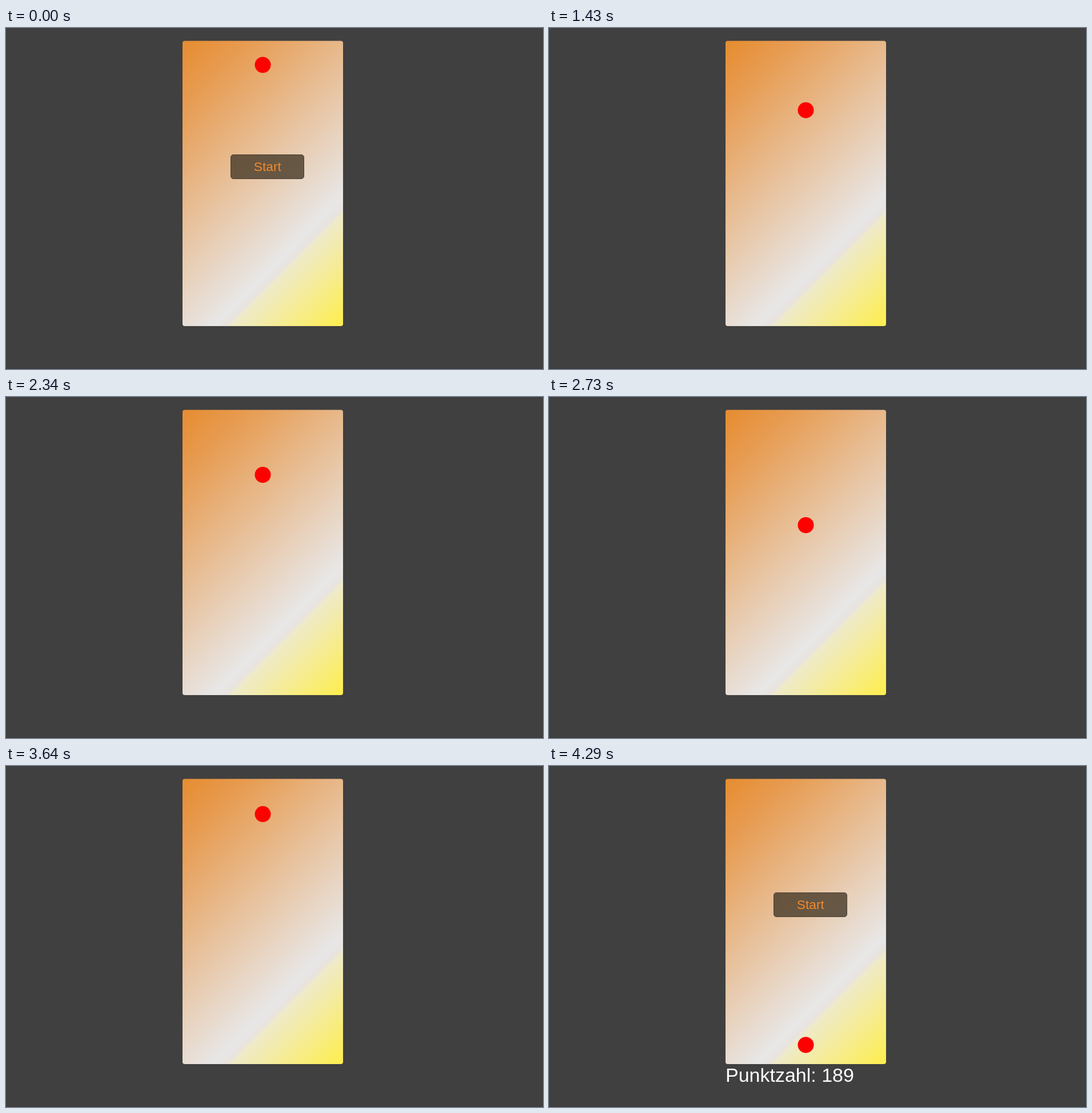
These frames come from a looping animation (940x596 px, 5.07 s). An HTML page:

```html
<!DOCTYPE html>
<html lang="de">
<head>
<meta charset="utf-8">
<title>Ballspiel</title>
<style>
  html, body { margin: 0; width: 100%; height: 100%; overflow: hidden; background: #404040; }
  svg { display: block; width: 940px; height: 596px; }
  text { font-family: "Liberation Sans", Arial, sans-serif; }
</style>
</head>
<body>
<svg viewBox="0 0 940 596">
  <defs>
    <linearGradient id="sky" gradientUnits="userSpaceOnUse" x1="254.75" y1="77" x2="644.25" y2="466.5">
      <stop offset="0" stop-color="#e68c30"/>
      <stop offset=".15" stop-color="#e79c52"/>
      <stop offset=".71" stop-color="#e8e7e7"/>
      <stop offset=".735" stop-color="#e8e3df"/>
      <stop offset=".75" stop-color="#efeac8"/>
      <stop offset="1" stop-color="#feee4c"/>
    </linearGradient>
  </defs>
  <rect width="940" height="596" fill="#404040"/>
  <rect y="595" width="940" height="1" fill="#393939"/>
  <rect x="309" y="22.5" width="281" height="498.5" rx="4" fill="url(#sky)"/>
  <circle id="ball" cx="449.5" cy="64.5" r="14" fill="#f00"/>
  <g id="button">
    <rect x="393.5" y="221.5" width="128" height="42" rx="4.5" fill="#463a28" fill-opacity=".8" stroke="#4a4036"/>
    <text x="457.8" y="250" font-size="22.7" text-anchor="middle" fill="#f28a2e">Start</text>
  </g>
  <text id="score" x="309" y="552" font-size="34" fill="#fff">Punktzahl: 189</text>
</svg>
<script>
  const LOOP = 5070, STEP = 130;
  const PLAY = 910, OVER = 4253;
  const GRAVITY = 1736; // px per s²
  const REST_Y = 64.5, FLOOR_Y = 487.5;

  // Each arc holds until its end time; peak is the moment of its highest point.
  const arcs = [
    { end: 1797, peak: 1128, top: REST_Y },
    { end: 2960, peak: 2405, top: 132.3 },
    { end: OVER, peak: 3568, top: 79.6 }
  ];

  const [ball, button, score] = ['ball', 'button', 'score'].map(id => document.getElementById(id));
  const show = (el, on) => el.setAttribute('visibility', on ? 'visible' : 'hidden');

  function ballY(t) {
    if (t < arcs[0].peak) return REST_Y;
    const arc = arcs.find(a => t < a.end);
    if (!arc) return FLOOR_Y;
    const s = (t - arc.peak) / 1000;
    return arc.top + GRAVITY / 2 * s * s;
  }

  function draw(t) {
    const over = t >= OVER;
    ball.setAttribute('cy', ballY(t).toFixed(1));
    show(button, t < PLAY || over);
    show(score, over);
  }

  const start = performance.now();
  function tick() {
    const t = (performance.now() - start) % LOOP;
    draw(Math.floor(t / STEP) * STEP);
    requestAnimationFrame(tick);
  }
  tick();
</script>
</body>
</html>
```
